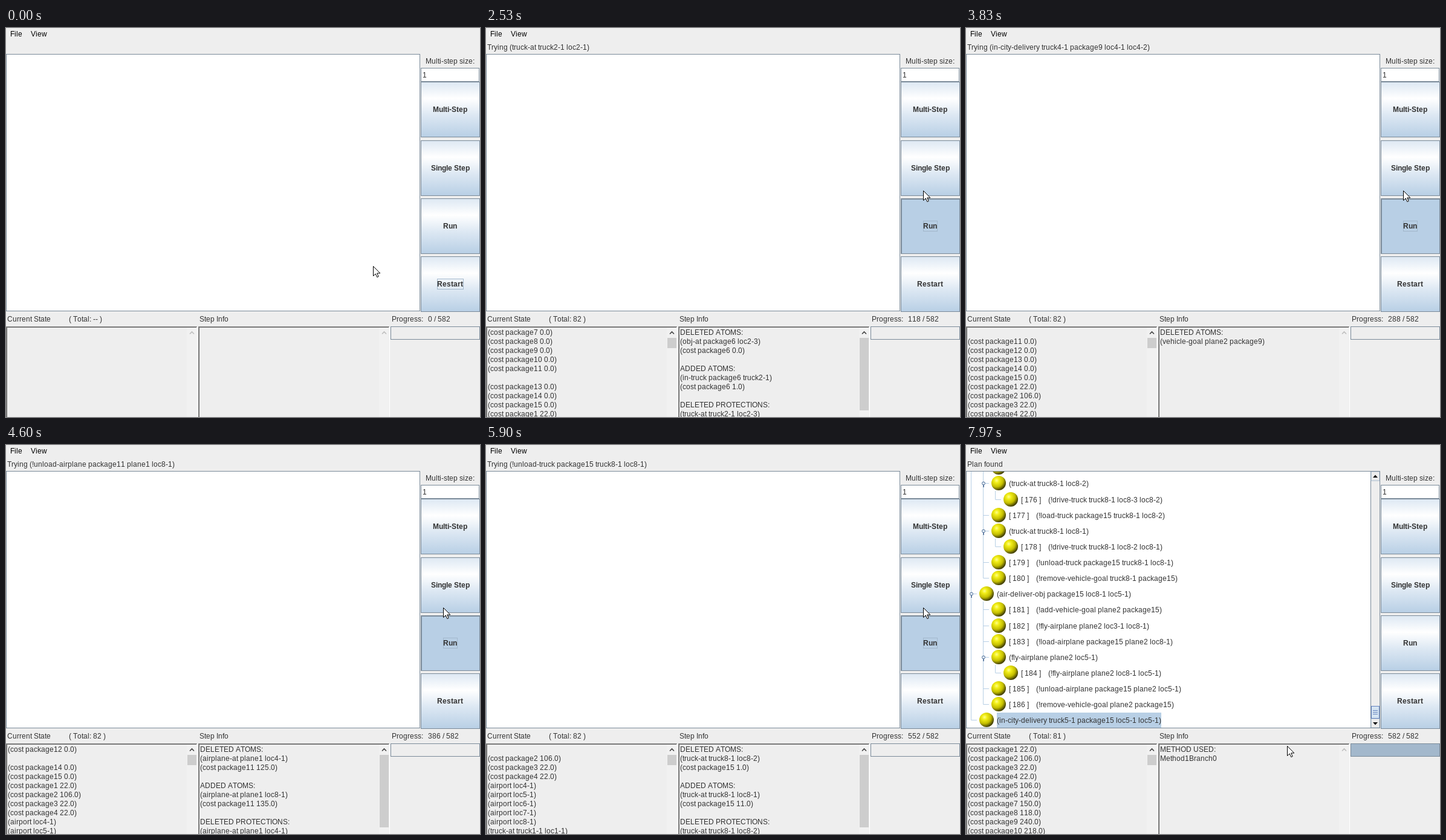
An HTML page for the animation above (8 s loop, 784x644 px).

```html
<!DOCTYPE html>
<html lang="en">
<head>
<meta charset="utf-8">
<title>Planner viewer</title>
<style>
  html, body { margin: 0; width: 100%; height: 100%; overflow: hidden; background: #eee; }
  svg { display: block; width: 784px; height: 644px; }
  text { font: 12px "Liberation Sans", Arial, sans-serif; fill: #333; white-space: pre; }
  .menu { fill: #000; }
  .bold { font-weight: bold; }
</style>
</head>
<body>
<svg id="stage" viewBox="0 0 784 644">
  <defs>
    <linearGradient id="metal" x2="0" y2="1">
      <stop offset="0" stop-color="#dde8f3"/>
      <stop offset=".3" stop-color="#fff"/>
      <stop offset=".6" stop-color="#dde8f3"/>
      <stop offset="1" stop-color="#b8cfe5"/>
    </linearGradient>
    <radialGradient id="gold" cx=".36" cy=".32" r=".68">
      <stop offset="0" stop-color="#ffff8c"/>
      <stop offset=".25" stop-color="#f2ee18"/>
      <stop offset=".65" stop-color="#c4be00"/>
      <stop offset="1" stop-color="#454200"/>
    </radialGradient>
    <clipPath id="view"><rect x="1" y="44" width="683" height="424"/></clipPath>
  </defs>
</svg>
<script>
const LOOP = 8000, TOTAL = 582, ROW = 15, ROWS = 10;
const FACE = '#eee', EDGE = '#7a8a99', ACTIVE = '#b8cfe5', FULL = '#a3b8cc';
const stage = document.getElementById('stage');
const ruler = document.createElement('canvas').getContext('2d');

function add(tag, attrs, parent = stage) {
  const node = document.createElementNS('http://www.w3.org/2000/svg', tag);
  for (const key in attrs) node.setAttribute(key, attrs[key]);
  parent.append(node);
  return node;
}
const box = (x, y, width, height, fill, stroke = 'none', parent) =>
  add('rect', { x, y, width, height, fill, stroke }, parent);
const path = (d, stroke, fill = 'none', parent) => add('path', { d, stroke, fill }, parent);
const show = (node, on) => node.setAttribute('visibility', on ? 'visible' : 'hidden');

// Glyph advances fall on whole pixels, as in an unsmoothed desktop toolkit
const advances = {};
function advance(char, bold) {
  const key = char + bold;
  if (!(key in advances)) {
    ruler.font = `${bold ? 'bold ' : ''}12px "Liberation Sans", Arial, sans-serif`;
    advances[key] = Math.round(ruler.measureText(char).width);
  }
  return advances[key];
}
function write(node, content) {
  if (node.textContent === content) return;
  const bold = node.classList.contains('bold');
  const widths = [...content].map(char => advance(char, bold));
  let x = +node.dataset.x;
  if (bold) x -= Math.round(widths.reduce((sum, w) => sum + w, 0) / 2);
  node.setAttribute('x', widths.map(w => (x += w) - w).join(' '));
  node.textContent = content;
}
function label(x, y, content = '', cls = '', parent) {
  const node = add('text', { 'data-x': x, y, class: cls }, parent);
  write(node, content);
  return node;
}

// Window frame
box(0, 0, 784, 644, FACE);
label(7, 14, 'File', 'menu');
label(41, 14, 'View', 'menu');
const status = label(2, 36);
box(.5, 43.5, 684, 425, '#fff', EDGE);
label(694, 59, 'Multi-step size:');
box(686.5, 66.5, 96, 22, '#fff', EDGE);
label(689, 82, '1');

function button(y, name, focusWidth) {
  const face = box(686.5, y + .5, 97, 91, 'url(#metal)', EDGE);
  const focus = box(735 - focusWidth / 2, y + 37.5, focusWidth, 17, 'none', FULL);
  label(735, y + 50, name, 'bold');
  return { face, focus };
}
button(89, 'Multi-Step', 62).focus.remove();
button(186, 'Single Step', 68).focus.remove();
const run = button(282, 'Run', 23);
const runEdge = path('M687.5 373V283.5H783', EDGE);
const restart = button(378, 'Restart', 43);

// Lower panes
label(2, 486, 'Current State');
const total = label(104, 486);
label(320, 486, 'Step Info');
label(638, 486, 'Progress:');
const counter = label(698, 486);
const progress = box(636.5, 494.5, 147, 21, FACE, EDGE);

function pane(x, thumbHeight) {
  box(x + 299, 496, 17, 148, '#f1f1f1');
  path(`M${x} 494.5H${x + 316}M${x + .5} 494V644`, '#8a8a8a');
  path(`M${x + 1} 495.5H${x + 315}M${x + 1.5} 495V644`, '#696969');
  path(`M${x + 316.5} 494V644`, '#fff');
  const arrow = path(`M${x + 304} 506.5l3.5-3.5l3.5 3.5`, '#444');
  arrow.setAttribute('stroke-width', 1.6);
  const thumb = box(x + 300, 513, 15, thumbHeight, '#cdcdcd');
  const lines = Array.from({ length: ROWS }, (_, i) => label(x + 3, 508 + i * ROW));
  return (content, scrolls) => {
    lines.forEach((line, i) => write(line, content[i] || ''));
    arrow.setAttribute('stroke', scrolls ? '#444' : '#bfbfbf');
    show(thumb, scrolls);
  };
}
const setState = pane(0, 17);
const setInfo = pane(318, 120);

// Plan tree: indent level, step number, task, has children
const tree = add('g', { 'clip-path': 'url(#view)' });
const tasks = [
  [1, 0, '(truck-at truck8-1 loc8-2)', 1],
  [2, 176, '(!drive-truck truck8-1 loc8-3 loc8-2)'],
  [1, 177, '(!load-truck package15 truck8-1 loc8-2)'],
  [1, 0, '(truck-at truck8-1 loc8-1)', 1],
  [2, 178, '(!drive-truck truck8-1 loc8-2 loc8-1)'],
  [1, 179, '(!unload-truck package15 truck8-1 loc8-1)'],
  [1, 180, '(!remove-vehicle-goal truck8-1 package15)'],
  [0, 0, '(air-deliver-obj package15 loc8-1 loc5-1)', 1],
  [1, 181, '(!add-vehicle-goal plane2 package15)'],
  [1, 182, '(!fly-airplane plane2 loc3-1 loc8-1)'],
  [1, 183, '(!load-airplane package15 plane2 loc8-1)'],
  [1, 0, '(fly-airplane plane2 loc5-1)', 1],
  [2, 184, '(!fly-airplane plane2 loc8-1 loc5-1)'],
  [1, 185, '(!unload-airplane package15 plane2 loc5-1)'],
  [1, 186, '(!remove-vehicle-goal plane2 package15)'],
  [0, 0, '(in-city-delivery truck5-1 package15 loc5-1 loc5-1)']
];
path('M8.5 44V455.5M28.5 44V220.5M28.5 259V429.5M48.5 76V90M48.5 155V168M48.5 364V377',
  ACTIVE, 'none', tree);
box(51, 443, 272, 26, ACTIVE, 'none', tree);
const ball = (cx, cy) => add('circle', { cx, cy, r: 12, fill: 'url(#gold)' }, tree);
ball(54, 37);
tasks.forEach(([level, number, task, parent], i) => {
  const y = Math.round(63.4 + i * 26.13), x = 34 + level * 20;
  path(`M${x - 25.5} ${y + .5}H${x - 16}`, ACTIVE, 'none', tree);
  ball(x, y);
  if (parent) {
    path(`M${x - 25} ${y + 3}V${y + 7}`, '#4a6a94', 'none', tree).setAttribute('stroke-width', 1.6);
    add('circle', { cx: x - 25, cy: y + .5, r: 2.5, fill: '#e4eef8', stroke: '#4a6a94' }, tree);
  }
  if (number) label(x + 17, y + 5, `[ ${number} ]`, '', tree);
  label(x + (number ? 62 : 17), y + 5, task, '', tree);
});
box(669.5, 43.5, 15, 425, FACE, EDGE, tree);
box(670, 44, 14, 15, FACE, FULL, tree);
box(670, 453, 14, 15, FACE, FULL, tree);
path('M673 54l4-4.5l4 4.5zM673 459l4 4.5l4-4.5z', 'none', '#111', tree);
box(670.5, 432.5, 13, 20, '#d5e4f2', '#6382bf', tree);
path('M673 439.5h8M673 442.5h8M673 445.5h8', '#6382bf', 'none', tree);

// Pointers
const arrow = path('M.5 .5V16.5L4.2 13L6.8 18.6L9.2 17.5L6.7 12H11.8Z', '#000', '#fff');
const beam = path('M728.5 271.5h3l1 1l1-1h3M732.5 272V285M728.5 286.5h3l1-1l1 1h3', '#000');

// Planning run: per package its origin, destination and plane
const routes = ('5-2 5-3 1,1-2 3-2 1,6-3 6-2 2,4-2 4-3 2,3-3 7-2 1,2-3 5-2 1,6-2 1-3 3,8-3 2-2 1,' +
  '7-3 4-2 2,1-3 6-2 3,4-3 8-2 1,3-2 1-2 2,7-2 3-1 3,2-2 6-3 1,8-2 5-1 2').split(',').map(r => r.split(' '));
const starts = [0, 14, 52, 64, 76, 109, 155, 198, 242, 290, 344, 396, 446, 494, 538, TOTAL];
const earlyCosts = [22, 106, 22, 22], finalCosts = [22, 106, 22, 22, 106, 140, 150, 118, 240, 218];
const cost = (id, value) => `(cost package${id} ${value.toFixed(1)})`;

function planStep(n, current) {
  const [from, to, planeId] = routes[current];
  const airborne = from[0] !== to[0];
  const share = (n - starts[current]) / (starts[current + 1] - starts[current]);
  const phase = Math.floor(share * (airborne ? 12 : 6));
  const id = current + 1, pkg = `package${id}`, flying = phase > 5;
  const hub = `loc${from[0]}-1`, farHub = `loc${to[0]}-1`;
  const kind = flying ? 'airplane' : 'truck';
  const vehicle = flying ? `plane${planeId}` : `truck${from[0]}-1`;
  const origin = flying ? hub : `loc${from}`;
  const goal = flying ? farHub : airborne ? hub : `loc${to}`;
  const go = place => `(${flying ? 'fly-airplane' : 'truck-at'} ${vehicle} ${place})`;
  const at = place => `(${kind}-at ${vehicle} ${place})`;
  const inside = `(in-${kind} ${pkg} ${vehicle})`, errand = `(vehicle-goal ${vehicle} ${pkg})`;
  const before = flying ? 122 : 0, loaded = before + (flying ? 3 : 1);
  const swap = (gone, fresh, guard) =>
    ['DELETED ATOMS:', ...gone, '', 'ADDED ATOMS:', ...fresh, '', 'DELETED PROTECTIONS:', guard];
  switch (phase % 6) {
    case 0: return [go(origin), ['ADDED ATOMS:', errand]];
    case 1: return [`(!load-${kind} ${pkg} ${vehicle} ${origin})`,
      swap([at(goal)], [at(origin)], at(goal))];
    case 2: return [go(goal),
      swap([`(obj-at ${pkg} ${origin})`, cost(id, before)], [inside, cost(id, loaded)], at(origin))];
    case 3: return [`(!unload-${kind} ${pkg} ${vehicle} ${goal})`,
      swap([at(origin), cost(id, loaded)], [at(goal), cost(id, loaded + 10)], at(origin))];
    case 4: return [`(!remove-vehicle-goal ${vehicle} ${pkg})`,
      swap([inside, cost(id, loaded + 10)], [`(obj-at ${pkg} ${goal})`, cost(id, loaded + 11)], at(goal))];
  }
  return [airborne && !flying ? `(air-deliver-obj ${pkg} ${hub} ${farHub})`
    : `(in-city-delivery truck${to[0]}-1 ${pkg} ${farHub} loc${to})`, ['DELETED ATOMS:', errand]];
}

function stateRows(n, current) {
  const rows = [];
  for (let id = current + 2; id <= 15; id++) rows.push(cost(id, 0));
  earlyCosts.slice(0, current).forEach((value, i) => rows.push(cost(i + 1, value)));
  for (let city = 4; city <= 8; city++) rows.push(`(airport loc${city}-1)`);
  for (let city = 1; rows.length < ROWS + 1; city++) rows.push(`(truck-at truck${city}-1 loc${city}-1)`);
  rows[((2 - n) % 11 + 11) % 11] = '';   // one row is always mid-repaint
  return rows;
}

// Step count against 30 fps ticks
const pace = [[49, 0], [76, 118], [115, 288], [160, 480], [184, TOTAL]];
function stepsAt(tick) {
  if (tick <= pace[0][0]) return 0;
  const i = pace.findIndex(([end]) => tick <= end);
  if (i < 0) return TOTAL;
  const [t0, n0] = pace[i - 1], [t1, n1] = pace[i];
  return Math.floor(n0 + (n1 - n0) * (tick - t0) / (t1 - t0));
}

const ease = (t, from, to) => {
  const k = Math.min(1, Math.max(0, (t - from) / (to - from)));
  return k * k * (3 - 2 * k);
};

function draw(t) {
  const n = stepsAt(Math.floor((t + 4) * .03));
  const idle = n === 0, done = n === TOTAL, pressed = t >= 1430 && !done;

  const approach = ease(t, 200, 1150), leave = ease(t, 6700, 7700);
  const x = 607 + 116 * approach - 192 * leave, y = 394 - 125 * approach + 229 * leave;
  arrow.setAttribute('transform', `translate(${Math.round(x)} ${Math.round(y)})`);
  const waiting = done && t < 6700;
  show(arrow, !waiting);
  show(beam, waiting);

  run.face.setAttribute('fill', pressed ? ACTIVE : 'url(#metal)');
  show(run.focus, pressed);
  show(runEdge, pressed);
  show(restart.focus, t < 1430);
  show(tree, done);
  progress.setAttribute('fill', done ? FULL : FACE);
  write(counter, `${n} / ${TOTAL}`);
  write(total, `( Total: ${idle ? '--' : done ? 81 : 82} )`);

  if (idle) {
    write(status, '');
    setState([], false);
    setInfo([], false);
  } else if (done) {
    write(status, 'Plan found');
    setState(finalCosts.map((value, i) => cost(i + 1, value)), true);
    setInfo(['METHOD USED:', 'Method1Branch0'], false);
  } else {
    const current = starts.findIndex(s => s > n) - 1;
    const [task, info] = planStep(n, current);
    write(status, `Trying ${task}`);
    setState(stateRows(n, current), true);
    setInfo(info, info.length > 7);
  }
}

const begin = performance.now();
function frame() {
  draw((performance.now() - begin) % LOOP);
  requestAnimationFrame(frame);
}
frame();
</script>
</body>
</html>
```
